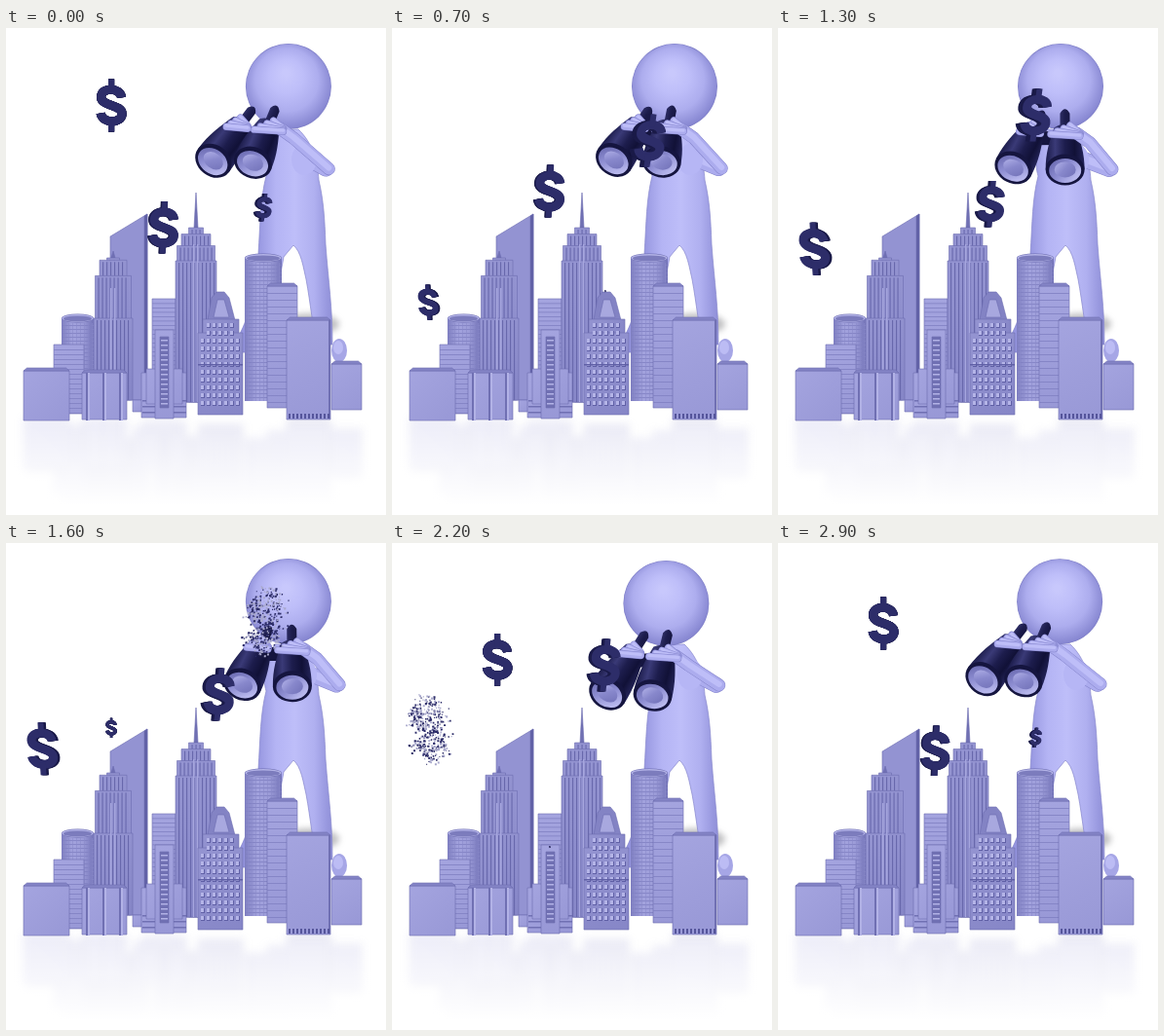
These frames come from a looping animation (390x500 px, 3000 ms). An HTML page with a canvas:

```html
<!DOCTYPE html>
<html lang="en">
<head>
<meta charset="utf-8">
<title>City lookout</title>
<style>
  html, body { margin: 0; width: 100%; height: 100%; overflow: hidden; background: #fff; }
  canvas { display: block; }
</style>
</head>
<body>
<canvas id="stage" width="390" height="500"></canvas>
<script>
const W = 390, H = 500, LOOP = 3000, STEP = 100;
const stage = document.getElementById('stage').getContext('2d');
const INK = '#2d2d69', NAVY = '#15153f', EDGE = '#6c6cb0', SHADE = '#7070b3', LIGHT = '#b2b2e6';
const FACE = ['#a4a4df', '#9898d6'], DIM = ['#9494d1', '#8686c7'];

function layer(draw) {
  const canvas = document.createElement('canvas');
  canvas.width = W;
  canvas.height = H;
  draw(canvas.getContext('2d'));
  return canvas;
}

function seeded(seed) {
  return () => (seed = (seed * 16807) % 2147483647) / 2147483647;
}

function ramp(gradient, colors) {
  colors.forEach((c, i) => gradient.addColorStop(i / (colors.length - 1), c));
  return gradient;
}

function disc(c, x, y, rx, ry, fill) {
  c.beginPath();
  c.ellipse(x, y, rx, ry, 0, 0, 7);
  c.fillStyle = fill;
  c.fill();
}

// ---------- city ----------
function drawCity(c) {
  const shape = (path, fill) => {
    c.fillStyle = fill;
    c.fill(path);
    c.strokeStyle = EDGE;
    c.lineWidth = 0.6;
    c.stroke(path);
  };
  const block = (x, y, w, h, colors = FACE) => {
    const path = new Path2D();
    path.rect(x, y, w, h);
    shape(path, ramp(c.createLinearGradient(x, y, x + w, y + h), colors));
  };
  const roof = (x, y, w) =>
    shape(new Path2D(`M${x} ${y}l3.5-3h${w - 7}l3.5 3z`), '#8484c6');
  const columns = (x, y, w, h, gap, color = SHADE, width = 1) => {
    c.fillStyle = color;
    for (let i = 0; i < w; i += gap) c.fillRect(x + i, y, width, h);
  };
  const floors = (x, y, w, h, gap, color = '#8080c2', width = 0.8) => {
    c.fillStyle = color;
    for (let i = 0; i < h; i += gap) c.fillRect(x, y + i, w, width);
  };
  const slab = (x, y, w, h, gap) => {
    block(x, y, w, h);
    floors(x, y + gap, w, h - gap, gap);
  };
  const cylinder = (x, y, w, h) => {
    c.fillStyle = ramp(c.createLinearGradient(x, 0, x + w, 0), ['#7e7ec0', '#a2a2dd', '#9c9cd8', '#7474b8']);
    c.fillRect(x, y, w, h);
    floors(x, y + 7, w, h - 7, 4);
    columns(x + 3, y + 5, w - 3, h - 5, 4, '#8a8aca', 0.6);
    disc(c, x + w / 2, y, w / 2, 4.5, EDGE);
    disc(c, x + w / 2, y, w / 2 - 0.4, 4, LIGHT);
    disc(c, x + w / 2, y + 0.4, w / 2 - 2, 3, '#7c7cbd');
  };
  // Tiers widen and deepen from the spire down
  const spireTower = (cx, tip, top, drop, power, half, base) => {
    shape(new Path2D(`M${cx - 2} ${top}L${cx} ${tip}L${cx + 2} ${top}z`), SHADE);
    for (let i = 3; i >= 0; i--) {
      const w = half - 1.5 * i * i, y = top + drop * ((3 - i) / 3) ** power;
      block(cx - w, y, 2 * w, base - y, DIM);
      columns(cx - w + 3, y + 2, 2 * w - 5, base - y - 2, 4, '#6868ac', 1.1);
    }
    columns(cx - 3, top + drop / 2, 8, base - top - drop / 2, 4, '#a6a6de', 1.4);
  };

  shape(new Path2D('M107 214L145 191V382H107z'), '#9393d2');
  shape(new Path2D('M142 193L145 191V382H142z'), '#6060a6');
  slab(150, 278, 24, 107, 4.5);
  spireTower(195, 169, 205, 34, 1.5, 21, 384);
  spireTower(110, 229, 236, 62, 3, 20, 382);
  block(130, 382, 10, 12);
  cylinder(57, 298, 33, 82);
  slab(49, 325, 31, 71, 5);
  cylinder(245, 236, 38, 147);
  slab(268, 265, 31, 125, 7);
  roof(268, 265, 31);

  // stepped tower with windows
  shape(new Path2D('M207 300L211 277L216 271H224L229 277L235 300z'), '#8383c4');
  shape(new Path2D('M213 297L217 279H224L229 297z'), '#a8a8df');
  block(202, 299, 37, 16, DIM);
  block(197, 313, 46, 84, DIM);
  for (let y = 303; y < 391; y += 8) {
    const inset = y < 312 ? 6 : 0;
    columns(200 + inset, y, 40 - 2 * inset, 5, 6, '#6060a6', 4);
    columns(200 + inset, y, 40 - 2 * inset, 4, 6, '#b4b4e7', 3);
  }
  floors(197, 345, 46, 2, 3, '#6060a6', 1.5);

  // low blocks in front
  block(18, 352, 47, 51);
  roof(18, 352, 47);
  block(78, 354, 46, 48);
  roof(78, 354, 46);
  columns(82, 354, 40, 49, 17, SHADE, 2);
  columns(84, 354, 40, 49, 17, LIGHT, 2);
  block(139, 354, 46, 46);
  floors(140, 382, 45, 18, 6, SHADE, 1.5);
  block(144, 350, 37, 36);
  block(153, 310, 19, 91);
  block(158, 317, 9, 73, [SHADE, SHADE]);
  floors(159, 320, 7, 68, 5, LIGHT, 1.5);
  block(334, 345, 31, 47);
  roof(334, 345, 31);
  block(288, 300, 45, 102);
  roof(288, 300, 45);
  columns(331, 300, 1, 101, 2, SHADE, 2);
  columns(290, 396, 41, 5, 4, '#55559b', 2);
}

// ---------- figure ----------
function drawBody(c) {
  c.save();
  c.filter = 'blur(3px)';
  disc(c, 312, 304, 30, 11, 'rgba(95,95,100,.4)');
  c.restore();
  disc(c, 342, 331, 8, 12, '#a6a6e6');
  disc(c, 341, 328, 5, 7, '#bcbcf4');
  const body = new Path2D(`M276 104C264 122 263 138 267 152C261 175 261 200 259 232
    C256 270 250 295 239 316L240 333H266C274 300 280 262 285 235L295 223
    C303 230 305 245 308 258C313 285 314 305 320 325H335C335 285 331 262 328 222
    C327 195 326 178 321 156C320 138 315 118 300 104Z`);
  c.fillStyle = ramp(c.createLinearGradient(257, 0, 336, 0),
    ['#9494de', '#b4b4f4', '#bebef9', '#b0b0f0', '#8c8cd6']);
  c.fill(body);
  c.strokeStyle = '#8686cc';
  c.lineWidth = 0.7;
  c.stroke(body);
}

const wave = (t, peak, period = LOOP) => Math.cos(2 * Math.PI * (t - peak) / period);

// A slow swing left to right with a light bob on top
function poseAt(t) {
  const swing = wave(t, 1350), dip = wave(t, 2050), bob = wave(t, 950, LOOP / 2);
  const lean = Math.max(0, wave(t, 2300)) ** 2;
  const lensY = 143 + 10 * dip + 4 * bob;
  return {
    head: [290 - 9 * lean, 60 + 2 * lean],
    lens: [[226 + 16 * swing - 3 * bob, lensY], [273 + 22 * swing - 2 * bob, lensY + 2]],
    eye: [0, 1].map(i => [261 + 24 * i + 9.5 * swing, 88.5 - i + 5 * dip + 2.5 * bob]),
    elbow: [342 + 6 * swing, 145 + dip]
  };
}

function limb(c, points, width) {
  c.lineCap = c.lineJoin = 'round';
  for (const [w, color, lift] of [[width + 1, '#8484cc', 0], [width, '#acacee', 0], [width * 0.5, '#bebef8', 1]]) {
    c.beginPath();
    points.forEach(([x, y]) => c.lineTo(x, y - lift));
    c.lineWidth = w;
    c.strokeStyle = color;
    c.stroke();
  }
}

// Local frame: eyepiece at the origin, barrel along +y
function drawBarrel(c, [ex, ey], [lx, ly]) {
  const len = Math.hypot(lx - ex, ly - ey);
  c.save();
  c.translate(ex, ey);
  c.rotate(Math.atan2(ly - ey, lx - ex) - Math.PI / 2);
  c.fillStyle = ramp(c.createLinearGradient(-20, 0, 20, 0), ['#1b1b49', '#3a3a77', '#1d1d4d', '#111137', '#25255a']);
  c.fill(new Path2D(`M-5 30V0Q0-9 5 0V30z
    M-11 ${len * 0.25}Q0 ${len * 0.12} 11 ${len * 0.25}C16 ${len * 0.5} 20 ${len * 0.7} 20 ${len}
    H-20C-20 ${len * 0.7}-16 ${len * 0.5}-11 ${len * 0.25}z`));
  disc(c, 0, len, 20, 16, NAVY);
  disc(c, 0, len + 1, 16.5, 12.5, ramp(c.createLinearGradient(-14, len - 12, 12, len + 12), ['#6666ad', '#8e8ed2', '#c1c1f3']));
  disc(c, 0, len, 11, 8, ramp(c.createLinearGradient(-10, len - 8, 8, len + 8), ['#b2b2e9', '#8888cc', '#7474ba']));
  c.restore();
}

function drawHand(c, x, y, size) {
  for (let i = 3; i >= 0; i--)
    limb(c, [[x + 12 * size, y + 3 - i], [x + (6 * i - 15) * size, y + 1 - 3 * i]], 6.5);
}

function drawFigure(c, t) {
  const { head: [hx, hy], lens, eye, elbow: [bx, by] } = poseAt(t);
  const [left, right] = eye.map(([x, y], i) =>
    [x + (lens[i][0] - x) * 0.3, y + (lens[i][1] - y) * 0.3]);

  limb(c, [[306, 132], [bx - 8, by]], 15);
  disc(c, 306, 135, 13, 16, '#b6b6f5');
  disc(c, hx, hy, 44, 44, '#8080c8');
  disc(c, hx, hy, 43.4, 43.4, ramp(c.createRadialGradient(hx - 3, hy - 14, 3, hx - 1, hy - 3, 47),
    ['#c8c8fc', '#bebef9', '#adadee', '#8484cf']));

  c.strokeStyle = NAVY;
  c.lineWidth = 14;
  c.beginPath();
  c.moveTo(left[0], left[1] + 8);
  c.lineTo(right[0], right[1] + 8);
  c.stroke();
  eye.forEach((e, i) => drawBarrel(c, e, lens[i]));
  drawHand(c, left[0] - 2, left[1], 0.8);
  limb(c, [[bx - 5, by], [right[0] + 26, right[1] + 13], [right[0] + 12, right[1] + 3]], 12);
  drawHand(c, right[0] + 2, right[1] + 3, 1.1);
}

// ---------- dollar signs ----------
const CURVE = new Path2D('M10.5-8C9-19-10.5-19-10.5-8.5C-10.5 1 11 -1 11 8.5C11 19-9 19-11 8');
const BAR = new Path2D('M0-27V-14M0 14V27');

// x, resting height, start time
const COINS = [[37, 176, 300], [219, 98, 700], [108, 55, 1400], [162, 140, 2200], [265, 65, 2700]];

const random = seeded(77);
const SPECKS = [];
stage.lineWidth = 9;
while (SPECKS.length < 1100) {
  const x = random() * 32 - 16, y = random() * 54 - 27;
  if (Math.abs(x) < 3 && Math.abs(y) > 14 || stage.isPointInStroke(CURVE, x, y))
    SPECKS.push({ x, y, dx: random() - 0.5, dy: random() - 0.5, fate: random(), size: 0.8 + random() });
}

function drawSign(c, color) {
  c.strokeStyle = color;
  c.lineCap = 'butt';
  c.lineWidth = 9;
  c.stroke(CURVE);
  c.lineWidth = 6;
  c.stroke(BAR);
}

function drawCoin(c, x, rest, age) {
  if (age >= 2000) return;
  const fade = Math.max(0, (age - 1600) / 400);
  const scale = Math.sin(Math.PI / 2 * Math.min(1, (age + 20) / 900)) * (1 + fade * 0.3);
  const tilt = (108 - x) / 1200;
  c.save();
  c.translate(x, rest + 172 * Math.exp(-age / 820) - 8 * fade ** 3);
  c.transform(scale, 0, tilt * scale, scale, 0, 0);
  if (fade) {
    const spread = 26 * fade ** 3, keep = 1.1 - fade ** 2 * 1.2;
    for (const s of SPECKS) {
      if (s.fate > keep) continue;
      c.fillStyle = s.fate < 0.2 ? '#a9a9cc' : INK;
      c.fillRect(s.x + s.dx * spread, s.y + s.dy * spread, s.size, s.size);
    }
  } else {
    for (let i = 4; i >= 0; i--) {
      c.save();
      c.translate((115 - x) / 32 * i / 4, 0);
      drawSign(c, i ? '#1a1a48' : INK);
      c.restore();
    }
  }
  c.restore();
}

// ---------- scene ----------
const city = layer(drawCity);
const backdrop = layer(c => {
  c.fillStyle = '#fff';
  c.fillRect(0, 0, W, H);
  c.save();
  c.globalAlpha = 0.2;
  c.filter = 'blur(4px)';
  c.translate(0, 804);
  c.scale(1, -1);
  c.drawImage(city, 0, 0);
  c.restore();
  c.fillStyle = ramp(c.createLinearGradient(0, 402, 0, 490), ['rgba(255,255,255,.1)', '#fff']);
  c.fillRect(0, 402, W, 98);
  drawBody(c);
  c.drawImage(city, 0, 0);
});

function frame(now) {
  const t = Math.floor(now % LOOP / STEP) * STEP;
  stage.drawImage(backdrop, 0, 0);
  drawFigure(stage, t);
  for (const [x, rest, start] of COINS) drawCoin(stage, x, rest, (t - start + LOOP) % LOOP);
  requestAnimationFrame(frame);
}
requestAnimationFrame(frame);
</script>
</body>
</html>
```
